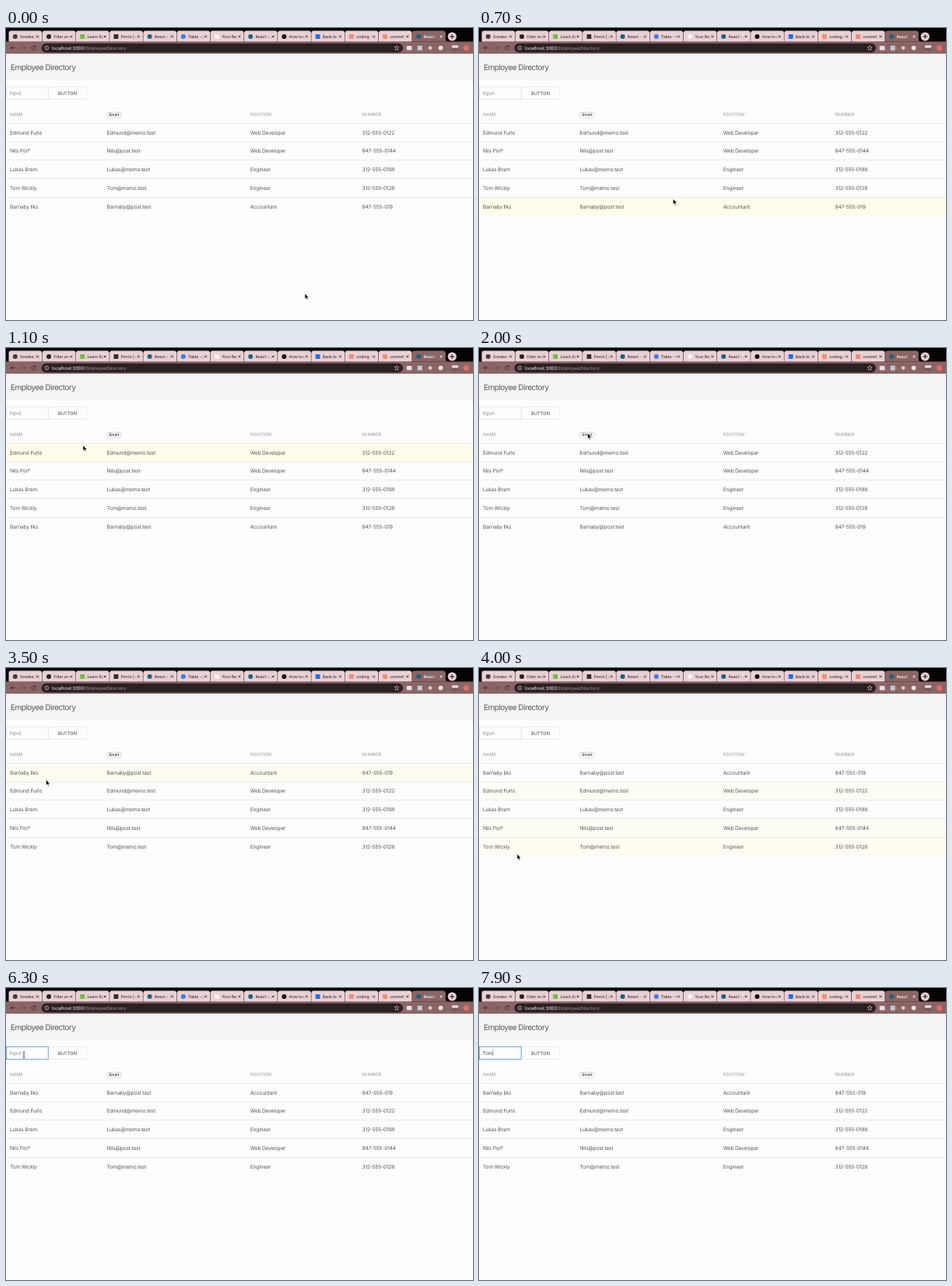
An HTML page that plays this animation: 600 px wide and 375 px high, repeating every 8000 ms.

```html
<!DOCTYPE html>
<html lang="en">
<head>
<meta charset="utf-8">
<title>Employee Directory</title>
<style>
  html, body { margin: 0; width: 100%; height: 100%; overflow: hidden; background: #fdfcfe; }
  svg { display: block; }
  text { font-family: Inter, Roboto, sans-serif; text-rendering: geometricPrecision; white-space: pre; }
  .title { font-size: 10px; letter-spacing: -.05em; fill: #5a595b; }
  .cell { font-size: 6.67px; letter-spacing: -.028em; fill: #5a595b; }
  .head { font-size: 5.83px; letter-spacing: -.01em; fill: #999; }
  .tab { font-size: 5.1px; font-weight: 500; fill: #3a2c2e; }
  .url { font-size: 5.83px; fill: #fff; }
</style>
</head>
<body>
<svg id="stage" width="600" height="375" viewBox="0 0 600 375"></svg>
<script>
const LOOP = 8000, STEP = 100;
const SORT_AT = 2600, PRESS_AT = 2500, FOCUS_AT = 5800;
const ROW_TOP = 122.3, ROW_HEIGHT = 23.75;
const COLUMNS = [5, 129.5, 313.7, 457.5];
const INK = '#2b2022', PINK = '#e9d1d5', BROWN = '#8b6565';

const people = [
  ['Edmund Furlo', 'Edmund@memo.test', 'Web Developer', '312-555-0122'],
  ['Nils Porf', 'Nils@post.test', 'Web Developer', '847-555-0144'],
  ['Lukas Bram', 'Lukas@memo.test', 'Engineer', '312-555-0188'],
  ['Tom Wickly', 'Tom@memo.test', 'Engineer', '312-555-0128'],
  ['Barnaby Ilks', 'Barnaby@post.test', 'Accountant', '847-555-019'],
];
const sorted = [...people].sort((a, b) => a[1] < b[1] ? -1 : 1);

const tabs = [
  ['Grades a', '#3c3c3c'], ['Filter arr', '#222'], ['Learn Ed', '#78b843', 1], ['Perch | g', '#2e2a30', 1],
  ['React - c', '#1d627c'], ['Table - S', '#3a7fe6'], ['Your Re', '#faf3f4'], ['React - A', '#1d627c'],
  ['How to c', '#111'], ['Back to t', '#2468ee', 1], ['coding -', '#ef8d6c', 1], ['commit', '#ef8d6c', 1],
  ['React', '#1d627c'],
];

// time, x, y of the pointer tip
const pointerPath = [
  [300, 384, 341], [900, 182, 158.6], [1000, 140, 139], [1100, 99, 125], [1200, 72, 116],
  [1500, 72, 116], [1800, 115, 113], [2000, 139.5, 109.6],
  [3300, 139.5, 109.6], [3400, 86, 120], [3500, 51.5, 143.6], [3700, 50, 145], [3800, 49, 160], [3900, 49, 203],
  [4000, 49, 239], [4100, 27, 121], [4400, 16.5, 94.5],
  [4500, 16.5, 94.5], [5100, 24.5, 86], [5200, 24.5, 86], [5300, 24, 86], [5400, 24, 86], [5500, 23, 86],
];

const rect = (x, y, w, h, fill, extra = '') =>
  `<rect x="${x}" y="${y}" width="${w}" height="${h}" fill="${fill}" ${extra}/>`;
const circle = (x, y, r, fill, extra = '') => `<circle cx="${x}" cy="${y}" r="${r}" fill="${fill}" ${extra}/>`;
const line = (d, color, width = .8, extra = '') =>
  `<path d="${d}" fill="none" stroke="${color}" stroke-width="${width}" ${extra}/>`;
const text = (x, y, cls, str, extra = '') => `<text x="${x}" y="${y}" class="${cls}" ${extra}>${str}</text>`;

function tabMarkup([label, color, square], i) {
  const x = 3.5 + i * 43.2, active = i === tabs.length - 1;
  const icon = square ? rect(x + 5.4, 8.1, 5.8, 5.8, color) : circle(x + 8.3, 11, 3, color);
  const flare = active ? 3.3 : 0;
  return `<path d="M${x - flare} 17.6q${flare} 0 ${flare}-3.3V6.7q0-3.3 3.3-3.3h36.2q3.3 0 3.3 3.3v7.6q0 3.3 ${flare} 3.3z"
      fill="${active ? BROWN : PINK}"/>` + icon +
    `<svg x="${x + 14.5}" y="5" width="19.5" height="12">${text(0, 7.9, 'tab', label, active ? 'style="fill:#fff"' : '')}</svg>` +
    line(`M${x + 35.6} 9.5l3 3m0-3l-3 3`, active ? '#fff' : INK, .8);
}

function browserMarkup() {
  return rect(0, 0, 600, 19, '#050304') + rect(0, 17.5, 600, 15.7, BROWN) + tabs.map(tabMarkup).join('') +
    circle(573.2, 11, 5.6, PINK) + line('M570.2 11h6m-3-3v6', '#111', 1) +
    line('M12 25.5H6.5m2.5-2.6l-2.6 2.6 2.6 2.6', '#2f2224') +
    line('M19.5 25.5H25m-2.5-2.6l2.6 2.6-2.6 2.6', '#5f4447') +
    line('M38 24a2.6 2.6 0 1 0 .4 2.2M38.4 22.4v2h-2', '#33262a') +
    rect(45.5, 19.8, 464.5, 11.6, INK, 'rx="5.8"') +
    circle(52.3, 25.6, 2.5, 'none', 'stroke="#d8c9cb" stroke-width=".7"') + line('M52.3 25.2v1.8m0-3.1v.7', '#d8c9cb', .7) +
    text(59, 27.6, 'url', 'localhost:3000<tspan fill="#a99a9d">/EmployeeDirectory</tspan>') +
    line('M502 22.6l.9 2 2.1.2-1.6 1.4.5 2.1-1.9-1.1-1.9 1.1.5-2.1-1.6-1.4 2.1-.2z', '#e6dadc', .6) +
    rect(514.6, 23, 6.8, 5.4, '#e9e0e1', 'rx="1"') + rect(528.6, 22.7, 6, 6, '#c3ccd2') +
    circle(545, 25.6, 2.4, '#f0c3b6') + circle(558.5, 25.6, 2.8, '#efe6e7') +
    rect(573, 22.3, 8, 3.4, '#e6dfe0') + rect(573, 25.7, 8, 3.2, '#6a5759') +
    circle(591.5, 25.6, 3.6, '#e2705f');
}

function rowMarkup(_, i) {
  const top = ROW_TOP + i * ROW_HEIGHT;
  return rect(0, top, 600, ROW_HEIGHT, '#fffde9', 'class="glow" opacity="0"') +
    rect(0, Math.floor(top), 600, 1, '#e9e8eb') +
    COLUMNS.map(x => text(x, top + 14.3, 'cell', '')).join('');
}

const stage = document.getElementById('stage');
stage.innerHTML = rect(0, 0, 600, 375, '#fdfcfe') + browserMarkup() +
  rect(0, 33, 600, 34, '#f4f3f5') + text(6, 54, 'title', 'Employee Directory') +
  rect(54.3, 75.4, 49.4, 16.2, '#fdfcfe', 'stroke="#e5e4e7" stroke-width=".7"') +
  text(67, 85.6, 'head', 'BUTTON', 'style="fill:#444"') +
  rect(.4, 75.4, 53.8, 16.2, '#fdfcfe', 'id="field" stroke-width=".8"') +
  text(4.4, 86, 'cell', '', 'id="entry"') + rect(0, 79.3, .6, 7.6, '#444', 'id="caret"') +
  ['NAME', '', 'POSITION', 'NUMBER'].map((s, i) => text(COLUMNS[i], 113.4, 'head', s)).join('') +
  rect(130, 108.3, 17.4, 6.8, '#fff', 'id="emailButton" rx="1.6" stroke="#bab9bc" stroke-width=".6"') +
  text(138.7, 113.4, 'tab', 'Email', 'text-anchor="middle" style="font-size:4.9px;fill:#222"') +
  people.map(rowMarkup).join('') +
  '<path id="arrow" d="M0 0V7L1.6 5.5 2.7 8 3.9 7.5 2.8 5.1H5z" fill="#000" stroke="#fff" stroke-width=".5"/>' +
  line('M-1.4-3.8q1.4 0 1.4.8 0-.8 1.4-.8M0-3V3M-1.4 3.8q1.4 0 1.4-.8 0 .8 1.4.8', '#222', .8, 'id="beam"');

const el = id => document.getElementById(id);
const [field, entry, caret, emailButton, arrow, beam] =
  ['field', 'entry', 'caret', 'emailButton', 'arrow', 'beam'].map(el);
const glows = [...stage.querySelectorAll('.glow')];
const cells = glows.map(g => {
  const list = [];
  for (let n = g.nextSibling; list.length < 4; n = n.nextSibling) if (n.tagName === 'text') list.push(n);
  return list;
});

function pointerAt(t) {
  const next = pointerPath.findIndex(p => p[0] > t);
  if (next === 0) return pointerPath[0].slice(1);
  if (next < 0) return pointerPath.at(-1).slice(1);
  const [t0, x0, y0] = pointerPath[next - 1], [t1, x1, y1] = pointerPath[next];
  const k = (t - t0) / (t1 - t0);
  return [x0 + (x1 - x0) * k, y0 + (y1 - y0) * k];
}
const hoveredRow = t => Math.floor((pointerAt(t)[1] - ROW_TOP) / ROW_HEIGHT);

// Rows fade in and out; the slow first pass keeps them fully lit.
function glowLevel(row, t) {
  const [now, before, earlier] = [0, 1, 2].map(n => hoveredRow(t - n * STEP) === row);
  if (t < SORT_AT) return now || before ? 1 : 0;
  if (now) return before ? 1 : .6;
  return before || earlier ? .45 : 0;
}

function mix(a, b, k) {
  return `rgb(${a.map((v, i) => Math.round(v + (b[i] - v) * k))})`;
}

function render(t) {
  const [x, y] = pointerAt(t);
  const typed = 'Tom'.slice(0, [7200, 7500, 7700].filter(at => t >= at).length);
  const overField = y < 92;

  (t < SORT_AT ? people : sorted).forEach((person, i) => {
    glows[i].setAttribute('opacity', glowLevel(i, t));
    person.forEach((s, c) => { cells[i][c].textContent = s; });
  });
  emailButton.setAttribute('fill', t >= PRESS_AT && t < SORT_AT ? '#dddcdf' : '#fff');

  const focus = Math.max(0, Math.min(1, (t - FOCUS_AT + STEP) / 300));
  field.setAttribute('stroke', mix([226, 225, 228], [74, 150, 200], focus));
  entry.textContent = typed || 'Input';
  entry.style.fill = typed ? '#5a595b' : '#999';
  caret.setAttribute('x', typed ? 4.6 + entry.getComputedTextLength() : 4.4);
  caret.setAttribute('opacity', t >= FOCUS_AT && (t < 6300 || t >= 6800) ? 1 : 0);

  arrow.setAttribute('opacity', overField ? 0 : 1);
  beam.setAttribute('opacity', overField && !typed ? 1 : 0);
  for (const shape of [arrow, beam]) shape.setAttribute('transform', `translate(${x} ${y})`);
}

function tick() {
  const t = performance.now() % LOOP;
  render(Math.floor(t / STEP) * STEP);
  requestAnimationFrame(tick);
}
tick();
</script>
</body>
</html>
```
